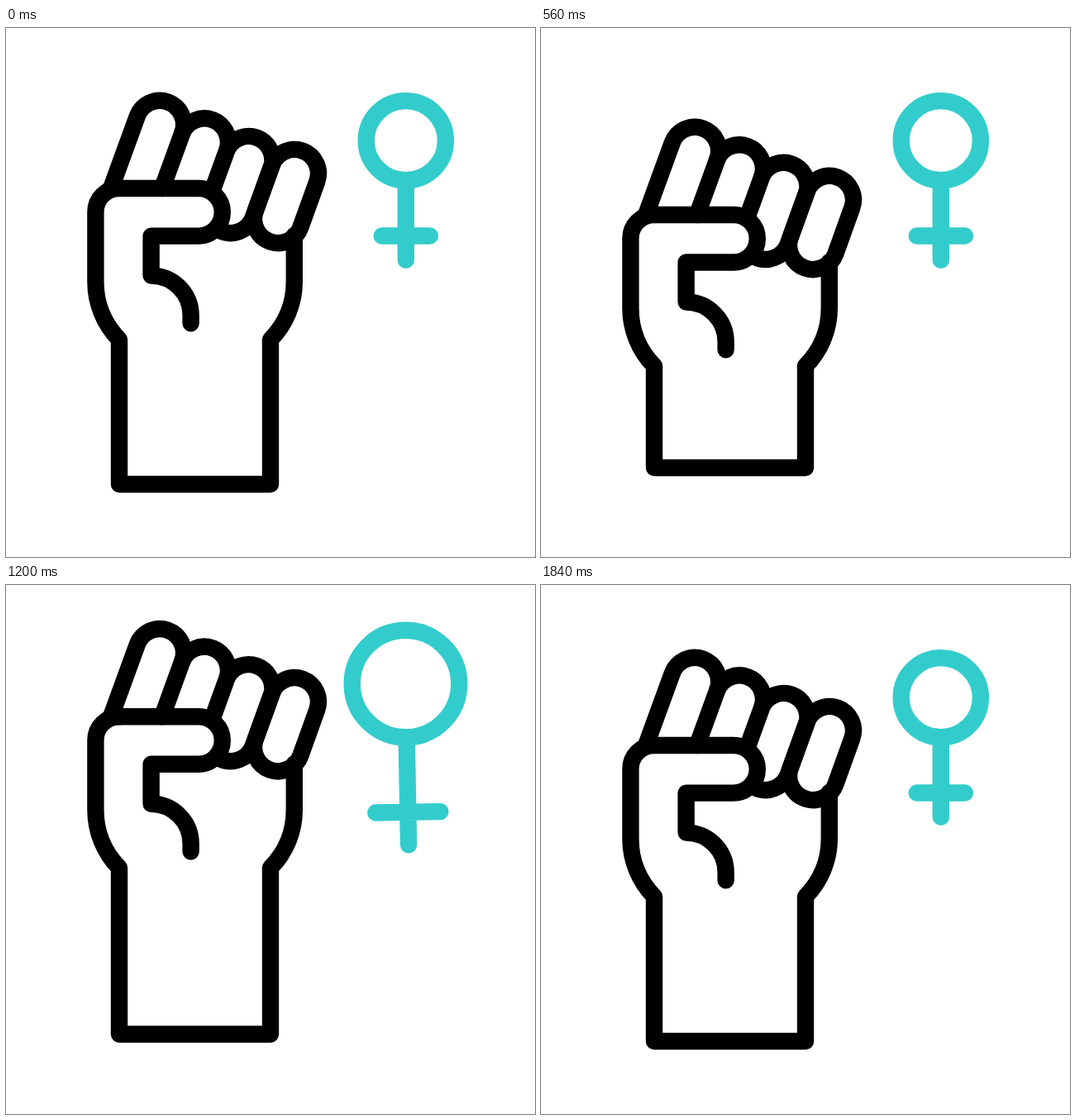
Recreate the animation shown at these times as an HTML page. Size 640 by 640 pixels, loop 2 s.

```html
<!DOCTYPE html>
<html lang="en">
<head>
<meta charset="utf-8">
<title>Raised fist</title>
<style>
  html, body { margin: 0; width: 100%; height: 100%; overflow: hidden; background: #fff; }
  svg { display: block; width: 100%; height: 100%; }
  svg * { fill: none; stroke-width: 20.4; stroke-linecap: round; stroke-linejoin: round; }
  .ink { stroke: #000; }
  .teal { stroke: #33cccc; }
</style>
</head>
<body>
<svg viewBox="0 0 640 640">
  <g class="ink">
    <g id="fist">
      <!-- fingers, left to right -->
      <path d="M127 194 L158.7 107 A29 29 0 0 1 213.3 126.9 L188.9 194"/>
      <path d="M213.3 126.9 A29 29 0 0 1 267.8 146.4 L250 195.5"/>
      <path d="M267.8 146.4 A29 29 0 0 1 321.8 166 L298.9 229 A29 29 0 0 1 258 244.6"/>
      <path d="M321.6 166.1 A29 29 0 0 1 376.2 185.9 L356.4 241 A29 29 0 0 1 301.8 221.2 Z"/>
      <!-- thumb -->
      <path d="M137 194 H233 A28.8 28.8 0 0 1 233 251.6 H175.6 V299.6 A48 48 0 0 1 223.6 347.6 V357.4"/>
    </g>
    <path id="arm"/>
  </g>
  <g class="teal">
    <g id="symbol">
      <circle id="ring" cx="483.8"/>
      <path id="cross"/>
    </g>
    <path class="ray"/>
    <path class="ray"/>
    <path class="ray"/>
  </g>
</svg>
<script>
  const LOOP = 2000, STEP = 40;
  const $ = id => document.getElementById(id);
  const rayEls = document.querySelectorAll('.ray');

  // Tracks of [time, value], eased in and out between keys
  const fistY = [[50, 0], [488, 38], [975, -64.5], [1450, 0]];
  const baseY = [[124, 552], [735, 527], [1500, 552]];
  const size = [[655, 1], [1125, 1.358], [1840, 1]];
  const tilt = [[655, 0], [970, 10], [1400, -10], [1840, 0]];
  const rayHead = [[667, 0], [967, 1]];
  const rayTail = [[810, 0], [1133, 1]];

  // Ray start and full extent
  const rays = [
    [384, 391, 25, -15],
    [386, 442.6, 31, -1],
    [387.5, 490, 26, 13.5]
  ];

  function at(track, t) {
    if (t <= track[0][0]) return track[0][1];
    for (let i = 1; i < track.length; i++) {
      const [t0, a] = track[i - 1], [t1, b] = track[i];
      if (t < t1) {
        const u = (t - t0) / (t1 - t0);
        return a + (b - a) * u * u * (3 - 2 * u);
      }
    }
    return track[track.length - 1][1];
  }

  function drawHand(t) {
    const y = at(fistY, t), base = at(baseY, t);
    $('fist').setAttribute('transform', `translate(0 ${y})`);
    $('arm').setAttribute('d',
      `M137 ${194 + y} A28.5 28.5 0 0 0 108.4 ${222.5 + y} V${307 + y}` +
      `C108.4 ${333 + y} 118.5 ${358 + y} 137 ${377 + y} V${base} H320 V${377 + y}` +
      `C338.5 ${358 + y} 348.8 ${333 + y} 348.8 ${307 + y} V${251 + y}`);
  }

  function drawSymbol(t) {
    const s = at(size, t), x = 483.8, top = 184.3, r = 48.1 * s;
    const barY = top + 67.2 * s, half = 29 * s;
    $('symbol').setAttribute('transform', `rotate(${at(tilt, t)} ${x} 136.2)`);
    $('ring').setAttribute('r', r);
    $('ring').setAttribute('cy', top - r);
    $('cross').setAttribute('d',
      `M${x} ${top} V${top + 96.6 * s} M${x - half} ${barY} H${x + half}`);
  }

  function drawRays(t) {
    const head = at(rayHead, t), tail = at(rayTail, t);
    rays.forEach(([x, y, dx, dy], i) => {
      const point = k => `${x + dx * k} ${y + dy * k}`;
      rayEls[i].setAttribute('d', head > tail ? `M${point(tail)} L${point(head)}` : '');
    });
  }

  const start = performance.now();
  function frame(now) {
    const elapsed = Math.max(0, now - start) % LOOP;
    const t = Math.floor(elapsed / STEP) * STEP;
    drawHand(t);
    drawSymbol(t);
    drawRays(t);
    requestAnimationFrame(frame);
  }
  frame(start);
</script>
</body>
</html>
```
